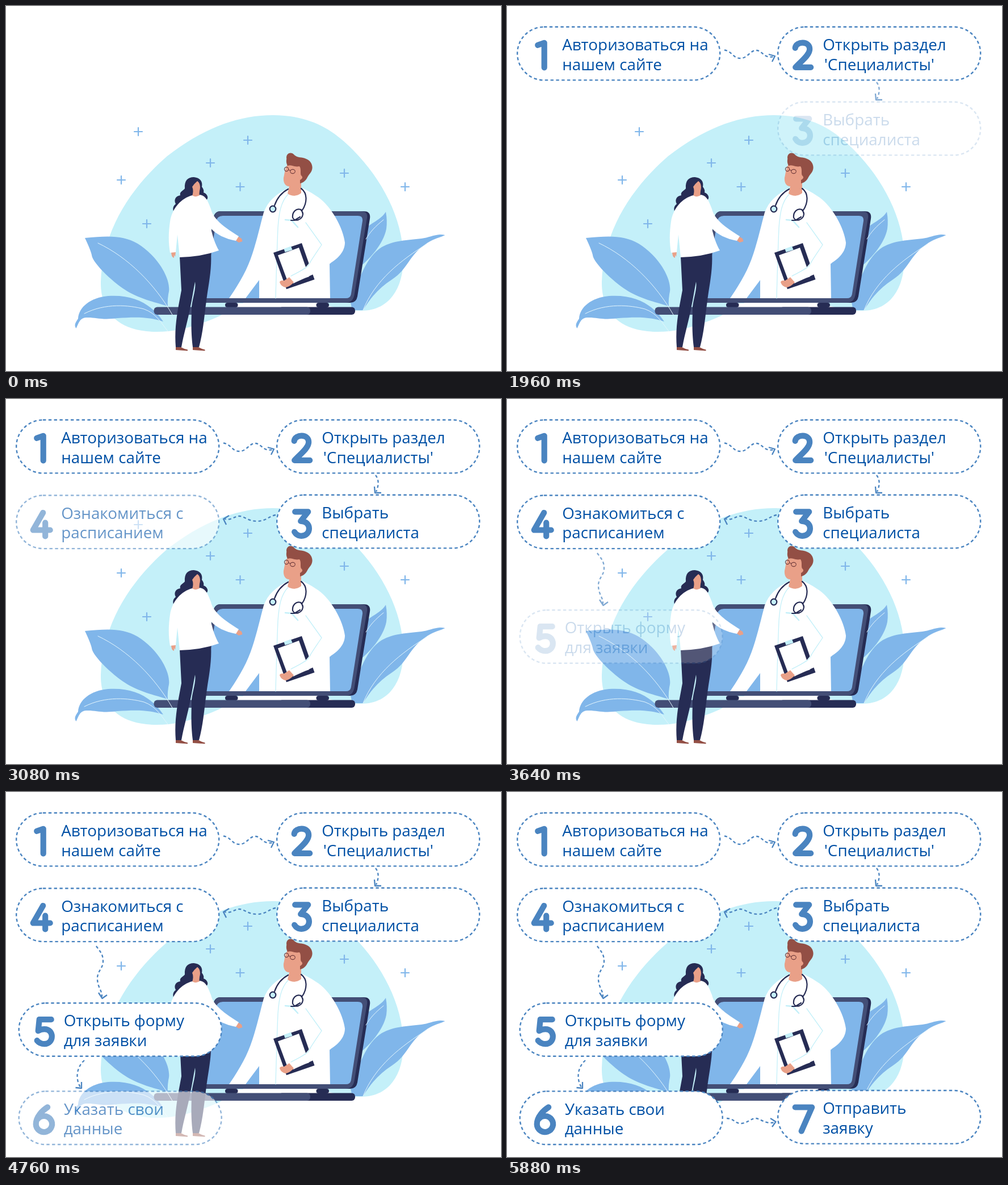
Animation, 872 px wide and 642 px high, one loop 6.44 s. Source, as an HTML page:

```html
<!DOCTYPE html>
<html lang="ru">
<head>
<meta charset="utf-8">
<title>Запись к специалисту</title>
<style>
  @property --tick { syntax: "<number>"; inherits: true; initial-value: 0; }

  html, body { margin: 0; width: 100%; height: 100%; overflow: hidden; background: #fff; }
  svg { display: block; width: 872px; height: 642px; animation: tick 6440ms steps(23) infinite; }
  @keyframes tick { from { --tick: 0; } to { --tick: 23; } }

  /* --at is the tick on which a part starts to fade in */
  .step { opacity: clamp(0, .2 + .4 * (var(--tick) - var(--at)), 1); }
  .arrow {
    opacity: calc(clamp(0, 9 * (var(--tick) - var(--at) + 1), 1) * min(1, .4 + .3 * (var(--tick) - var(--at))));
    fill: none; stroke: #4a84c0; stroke-width: 2.3; stroke-linejoin: round;
  }
  .arrow .trail { stroke-dasharray: 5 4.2; }
  .pill { fill: #fff; stroke: #4a84c0; stroke-width: 2.4; stroke-dasharray: 5.4 4.4; }
  .digit { fill: none; stroke: #4a84c0; stroke-width: 10.2; stroke-linecap: round; stroke-linejoin: round; }
  .step text { font: 27.8px "Open Sans", "Noto Sans", sans-serif; fill: #0050a5; }

  .sky { fill: #c4f0f9; }
  .leaf { fill: #80b6ea; }
  .navy { fill: #262c54; }
  .slate { fill: #434e76; }
  .skin { fill: #e9a088; }
  .brown { fill: #934f45; }
  .white { fill: #fff; }
  .line { fill: none; stroke-linecap: round; stroke-linejoin: round; }
  .vein { stroke: #e4f6fd; stroke-width: 1; }
  .seam { stroke: #c4f0f9; stroke-width: 1.3; }
  .pocket { stroke-width: 2.5; }
  .tube { stroke: #262c54; stroke-width: 2.2; }
</style>
</head>
<body>
<svg viewBox="0 0 872 642" xmlns="http://www.w3.org/2000/svg">
  <path class="sky" d="M167 485C170 400 214 325 284 264C349 214 410 192 470 192C530 192 570 213 605 247C660 300 698 370 700 440C701 490 680 536 625 536C560 535 540 508 480 508C420 508 400 540 350 556C320 567 295 573 265 573C200 573 166 540 167 485Z"/>

  <path class="line" stroke="#80b6ea" stroke-width="2.2" d="M226 221h14m-7-7v14M196 306h14m-7-7v14M241 383h14m-7-7v14M353 276h14m-7-7v14M419 236h14m-7-7v14M405.500 318h14m-7-7v14M589 294h14m-7-7v14M696 318h14m-7-7v14"/>

  <g class="leaf">
    <path d="M139 408C180 404 206 403 232 418C266 439 290 478 287 502Q284 516 285 528C239 515 222 509 198 491C175 473 152 449 151 438Q149 429 139 408Z"/>
    <path d="M123.500 567C119 561 123 556 127 550C128 530 148 513 180 510C226 507 257 525 277 555C250 546 226 547 196 549C167 553 158 547 141 548C129 549 128 559 123.500 567Z"/>
    <path d="M669 362C662 375 642 382 630 394L615 466C642 445 665 418 670 392Q672 377 669 362Z"/>
    <path d="M773.500 403C761 399 747 407 732 409C706 412 684 412 662 424C632 443 622 485 606 517L610 535H629C642 513 658 495 680 481C708 463 710 438 739 419C753 409 763 408 773.500 403Z"/>
  </g>

  <!-- laptop -->
  <path class="navy" d="M378 361H630Q643 361 641 374L619 511Q617 522 606 522H351Q343 522 345 512L365 374Q367 361 378 361Z"/>
  <path class="slate" d="M378 361H625Q638 361 636 373L614 506Q612 522 598 522H351Q343 522 345 512L366 374Q368 361 378 361Z"/>
  <path class="leaf" d="M382 369H620Q629 369 628 378L608 506Q607 514 599 514H350L370 379Q372 369 382 369Z"/>
  <path class="white" d="M408 523H548V530H408Z"/>
  <rect class="navy" x="386" y="522" width="22.500" height="8" rx="4"/>
  <rect class="navy" x="546.500" y="522" width="22.500" height="8" rx="4"/>
  <rect class="navy" x="480" y="529.500" width="135" height="13.500" rx="6"/>
  <rect class="slate" x="260.500" y="529.500" width="275.500" height="13.500" rx="6"/>

  <g class="line vein">
    <path d="M162 417C215 442 262 489 293 543"/>
    <path d="M138 541C175 522 217 526 243 533C265 541 273 557 285 572"/>
    <path d="M665 376C650 388 641 398 634 410"/>
    <path d="M742 418C696 447 650 482 629 535"/>
  </g>

  <!-- doctor -->
  <path class="white" d="M496 321C475 331 461 344 454 363C448 385 442 412 434 436C425 464 411 488 393 514H422L446 482V514H571L570 453C586 444 597 431 597 416C594 391 574 354 551 337Q538 328 524 321Z"/>
  <path class="skin" d="M497 277C491 285 491 294 489 302C488 313 494 318 499 317L496 330Q508 338 520 329V311Q526 301 521 296V278Z"/>
  <path class="brown" d="M496 281C492 273 495 270 494 267C494 258 503 256 508 262C514 268 521 265 529 269C541 274 542 287 536 294C529 302 530 309 518 312L518 306Q524 303 521 299C517 297 521 287 517 282C507 284 503 278 496 281Z"/>
  <g class="line" stroke="#713c3d" stroke-width="1.100">
    <ellipse cx="494" cy="287" rx="3.600" ry="3.600"/>
    <ellipse cx="505" cy="291" rx="4.300" ry="3.600"/>
    <path d="M497.500 288L501 289.500"/>
  </g>
  <g class="line seam">
    <path d="M497 331C484 345 481 363 479 390Q477 438 475 514"/>
    <path class="pocket" d="M492 376L503 377L514 389"/>
  </g>
  <g class="line tube">
    <path d="M497 322C484 329 477 339 473 351M520 321C531 329 531 345 522 359"/>
    <path d="M521 359C512 354 504 362 505 372C508 381 522 376 523 366C523 362 521 360 519 358M502 377H508L518 371"/>
    <circle cx="470" cy="357" r="5.300" fill="#c4f0f9"/>
  </g>
  <path class="navy" d="M471 434L521 417L543.500 481L494 498Z"/>
  <path class="white" d="M479 438.500L516 425L534 476L497.500 488Z"/>
  <path class="sky" d="M489.500 427L502 422.500L504.500 429L491.500 433Z"/>
  <path class="white" d="M501 475C518 469 532 459 537 446L556 420L594 428L571 453L541 472L506 488Z"/>
  <path class="line seam" d="M528 381L556 420C544 438 536 449 533 456C527 463 511 470 502 475"/>
  <path class="skin" d="M482 486Q483 482 490 483L499 477L507 486Q501 493 493 495Q485 494 482 486Z"/>

  <!-- patient -->
  <path class="navy" d="M306 441L361 433C363 465 356 493 353 518C349 548 347 575 340 600H329C325 568 327 545 327 529C329 512 335 498 333 485C330 500 328 514 325 528C320 555 313 577 309 600H299C296 563 303 533 309 500Z"/>
  <path class="brown" d="M299 600H308Q313 603 320 604.500V606.500L299 605Z"/>
  <path class="brown" d="M329 600H339Q344 603 350.500 604.500V606.500L329 605Z"/>
  <path class="navy" d="M295 361C293 354 296 351 299 348C295 341 299 334 307 333C305 327 312 325 315 321C314 307 320 301 331 301C342 302 347 309 345 318C348 322 349 325 348 328C356 331 357 339 353 341L315 347Q300 349 295 361Z"/>
  <path class="skin" d="M337 308C342 311 343 319 341 325Q340 330 341 335Q334 338 328 334Q331 325 328 318Q331 313 337 308Z"/>
  <path class="skin" d="M291 432H299L298 441L296 438L296 443Q291 442 291 432Z"/>
  <path class="skin" d="M404 412L408 405L415 409L416.500 414L410 416Z"/>
  <path class="white" d="M328 333Q335 338 342 332C353 334 356 345 361 357C365 377 391 393 410 405L405 413C387 410 369 401 361 391C364 405 368 418 375 430Q345 441 306 442L302 402L299 433L289 434C286 417 286 399 289 379C293 355 309 338 328 333Z"/>

  <g id="steps"></g>
</svg>
<script>
  // corner of the pill, digit path inside it, two lines of text, indent of the second line
  const steps = [
    [18.2, 36.8, "M36 32L47.500 28V71.500", "Авторизоваться на", "нашем сайте"],
    [477.2, 36.8, "M30.500 37C32 25 56 24 56 39C56 50 40 61 31 71H58", "Открыть раздел", "'Специалисты'", 2.5],
    [477.2, 168.8, "M32 29.500H55L42 46C62 46 61 72 43 72Q35 72 31 65", "Выбрать", "специалиста"],
    [18.2, 169.5, "M47 30.500L29.500 61H59.500M51 48V72", "Ознакомиться с", "расписанием"],
    [22.7, 371.2, "M57 29H36L34 49Q39 46 45 46C63 46 62 72 45 72Q37 72 32 66", "Открыть форму", "для заявки"],
    [22.7, 526.4, "M50.500 28C41 34 30 45 30 58A14.200 14 0 1 0 33 49", "Указать свои", "данные"],
    [477.2, 525, "M30.500 29.500H60L41.500 71.500", "Отправить", "заявку"]
  ];
  // dashed trail, arrow head
  const arrows = [
    ["M383 77.500C396 79 398 92 411 92S428 78 439 78S452 93 470 89", "M461 85L472 88L467 98"],
    ["M651 134C657 141 657 152 652 163", "M649 154L650 165L661 165"],
    ["M475 204C463 206 458 215 442 215S420 206 411 206S397 214 385 211", "M393 205L383 211L388 221"],
    ["M159 271C165 280 171 284 171 298C171 311 160 315 161 330C162 345 169 348 169 360", "M163 353L169.500 363L178 357"],
    ["M138 472C124 484 122 505 131 519", "M122.500 520L133 521L133 510"],
    ["M387 574C400 574 402 584 413 583S430 574 438 574S455 585 471 581", "M464 574L473.500 580L467 589"]
  ];
  const drawStep = ([x, y, digit, top, bottom, indent = 0], i) => `
    <g class="step" style="--at:${1 + 3 * i}" transform="translate(${x} ${y})">
      <rect class="pill" width="357" height="93.600" rx="46.800"/>
      <path class="digit" d="${digit}"/>
      <text x="79" y="41.300">${top}</text>
      <text x="${79 + indent}" y="75.800">${bottom}</text>
    </g>`;
  const drawArrow = ([trail, head], i) => `
    <g class="arrow" style="--at:${3 + 3 * i}"><path class="trail" d="${trail}"/><path d="${head}"/></g>`;
  document.getElementById("steps").innerHTML = steps.map(drawStep).join("") + arrows.map(drawArrow).join("");
</script>
</body>
</html>
```
